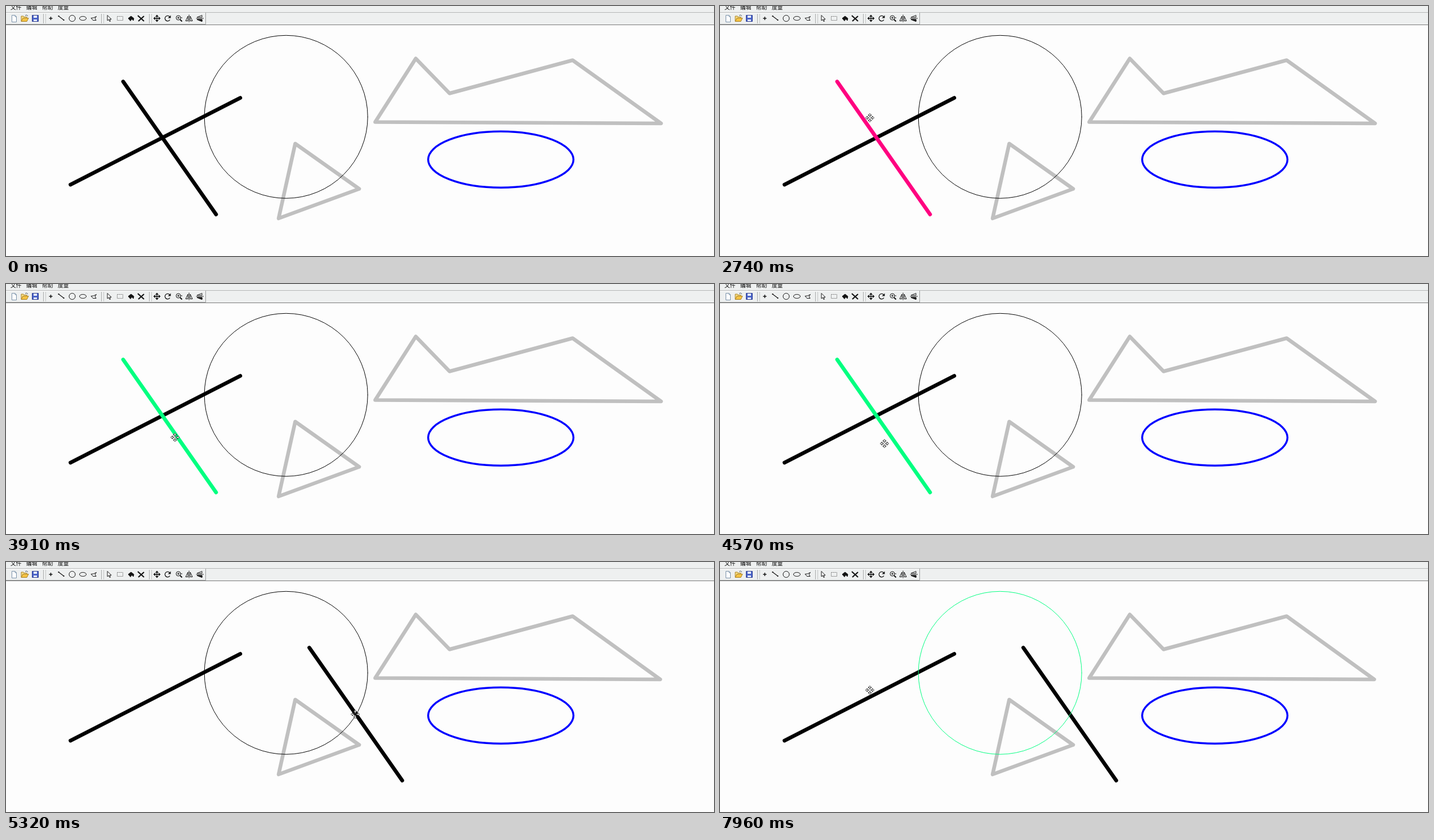
An HTML page with a canvas that plays this animation: 1257 by 445 pixels, repeating every 7.99 s.

```html
<!DOCTYPE html>
<html lang="zh">
<head>
<meta charset="utf-8">
<title>Drawing tool</title>
<style>
  html, body { margin: 0; width: 100%; height: 100%; overflow: hidden; background: #fdfdfd; }
  svg, canvas { position: absolute; left: 0; top: 0; display: block; }
  .menu { font: 9.7px "Noto Sans CJK SC", "Noto Sans CJK", sans-serif; fill: #000; }
</style>
</head>
<body>
<svg width="1257" height="34" viewBox="0 0 1257 34" fill="none" stroke="#111">
  <path d="M0 0H1257V33H0z" fill="#eef0f0" stroke="none"/>
  <g class="menu" stroke="none">
    <text x="8" y="6">文件</text><text x="36" y="6">编辑</text>
    <text x="64" y="6">帮助</text><text x="92" y="6">度量</text>
  </g>
  <path d="M0 11.5H1257" stroke="#b4b6b6"/>
  <path d="M0 12.5H354" stroke="#fff"/>
  <path d="M0 32.5H354.5V12" stroke="#9a9c9c"/>
  <path d="M0 33.5H1257" stroke="#777"/>
  <path d="M66.5 14V31M169.5 14V31M254.5 14V31" stroke="#a8aaaa"/>
  <path d="M70.5 14V31M173.5 14V31M258.5 14V31" stroke="#c4c6c6"/>

  <path d="M10.500 16.500H16L18.500 19V28.500H10.500z" fill="#fff" stroke="#7890a8"/>
  <path d="M16 16.500V19H18.500" stroke="#7890a8"/>
  <path d="M27 27V18H31L32 19.500H37V21" fill="#f6dc83" stroke="#a88024"/>
  <path d="M27 27.500L30 21.500H40L37 27.500z" fill="#f5c344" stroke="#a88024"/>
  <path d="M34 17Q37 14.500 39 18" stroke="#456"/>
  <path d="M46.500 16.500H57.500V27.500H46.500z" fill="#4a63c8" stroke="#2c3c90"/>
  <path d="M49 17H55V21H49zM49 24H55V27H49z" fill="#e6ecfa" stroke="none"/>

  <path d="M79.500 19V25M76.500 22H82.500" stroke-width="1.400"/>
  <path d="M94 18.500L102 24.500" stroke-width="1.200"/>
  <path d="M92.500 17h2v2h-2zM101.500 24h2v2h-2z" fill="#111" stroke="none"/>
  <circle cx="117.500" cy="22" r="5.500"/>
  <ellipse cx="136.500" cy="22" rx="6" ry="3.500"/>
  <path d="M151 21.500L155.500 21L160.500 18.500L158 22L160 25.500L154.500 25.500z"/>

  <path d="M180 16.500V26L182.300 24L184 27.500L185.500 27L184 23.500H187z" fill="#fff"/>
  <path d="M197.500 18.500H207.500V25.500H197.500z" stroke-dasharray="2 1" stroke="#777"/>
  <path d="M217 22L222 18L227 22L226 26L223.500 23L221 26.500z" fill="#111"/>
  <path d="M234 17L245 27M245 18L235 27" stroke-width="2.200"/>

  <path d="M268 17V27M263 22H273" stroke-width="1.300"/>
  <path d="M268 15.500L271 19H265zM268 28.500L271 25H265zM261.500 22L265 19V25zM274.500 22L271 19V25z" fill="#111" stroke="none"/>
  <path d="M290.500 19A4.700 4.700 0 1 0 291 24.500" stroke-width="1.300"/>
  <path d="M292.500 16.500V21.500H287.500z" fill="#111" stroke="none"/>
  <circle cx="306" cy="21" r="4"/>
  <path d="M309 24L312.500 27.500" stroke-width="2"/>
  <path d="M304 21H308M306 19V23M310 21H313"/>
  <path d="M325 15.500V28.500M323 18V26.500H319zM327 18V26.500H331z"/>
  <path d="M337.500 22H351M348 20V16.500L339 20zM348 24V27.500L339 24z" stroke="#222"/>
  <path d="M348 24V27.500L339 24z" fill="#222"/>
</svg>
<canvas id="stage" width="1257" height="445"></canvas>

<script>
const ctx = document.getElementById('stage').getContext('2d');
const LOOP = 7990, STEP = 30, START = 100;
const PINK = '#ff0080', GREEN = '#00ff80', GRAY = '#c0c0c0';

// pointer path: time, x, y
const path = [
  [100, 1214, 36], [220, 1069, 55], [340, 910, 69], [460, 711, 71], [610, 449, 37],
  [760, 190, 13], [800, 147, 11], [880, 181, 25], [1300, 181, 25],
  [1390, 191, 56], [1480, 211, 97], [1660, 242, 176], [1930, 242, 176],
  [2050, 258, 125], [2150, 262, 70], [2320, 269, 24], [2590, 269, 24],
  [2740, 266, 199], [2920, 289, 253], [3010, 289, 253], [3220, 259, 211],
  [3400, 301, 204], [3490, 321, 204], [3640, 343, 242], [3910, 300, 273],
  [4180, 174, 280], [4390, 219, 288], [4570, 292, 284], [4870, 412, 281],
  [5020, 544, 269], [5110, 608, 269], [5200, 620, 271], [5350, 620, 271],
  [5680, 195, 41], [5740, 181, 25], [5980, 181, 25], [6310, 384, 105],
  [6550, 384, 105], [6760, 280, 54], [6940, 270, 24], [7270, 270, 24],
  [7510, 456, 148], [7600, 456, 148], [7720, 388, 150], [7840, 278, 162],
  [7930, 280, 224], [7960, 266, 228], [7990, 266, 228]
];
const selectTool = { x: 173, clicks: [1120, 5830] };
const moveTool = { x: 258, clicks: [2470, 7150] };
// moments at which the inverted drag preview is on screen
const previews = [3220, 3400, 3430, 3490, 3640, 4180, 4240, 4330, 4390, 4720, 4870, 5020, 5110, 7720, 7840];

const within = (t, a, b) => t >= a && t < b;

function slope(i, k) {
  const a = path[i - 1], b = path[i], c = path[i + 1];
  if (!a || !c) return 0;
  const before = b[k] - a[k], after = c[k] - b[k];
  return before * after <= 0 ? 0 : (before + after) / (c[0] - a[0]);
}

function pointer(t) {
  let i = 0;
  while (i < path.length - 2 && path[i + 1][0] <= t) i++;
  const a = path[i], b = path[i + 1], d = b[0] - a[0], u = (t - a[0]) / d;
  const s = u * u * (3 - 2 * u);
  return [1, 2].map(k => a[k] + (b[k] - a[k]) * s
    + d * u * (1 - u) * ((1 - u) * slope(i, k) - u * slope(i + 1, k)));
}

function poly(points, color, width, closed) {
  ctx.beginPath();
  for (let i = 0; i < points.length; i += 2) ctx.lineTo(points[i], points[i + 1]);
  if (closed) ctx.closePath();
  ctx.strokeStyle = color;
  ctx.lineWidth = width;
  ctx.stroke();
}

function oval(x, y, rx, ry, color, width) {
  ctx.beginPath();
  ctx.ellipse(x, y, rx, ry, 0, 0, 7);
  ctx.strokeStyle = color;
  ctx.lineWidth = width;
  ctx.stroke();
}

const bar = (dx, dy, color) => poly([208 + dx, 134.5 + dy, 373 + dx, 371 + dy], color, 6.6);
const ring = (dx, dy, color) => oval(497.2 + dx, 197.3 + dy, 145, 145, color, 1);

function button(tool, t, x, y) {
  if (!within(x, tool.x, tool.x + 20) || !within(y, 13, 32)) return;
  const down = tool.clicks.some(c => within(t, c, c + STEP));
  const l = tool.x + .5, r = l + 19, top = 13.5, bottom = 30.5;
  poly([l, bottom, l, top, r, top], down ? '#888' : '#fff', 1);
  poly([l, bottom, r, bottom, r, top], down ? '#fff' : '#888', 1);
}

const arrow = new Path2D('M.5 .5V12L3.200 9.500L5 14L6.800 13.200L5 9H8.300z');
const moveArm = new Path2D('M0-7.500L3-4.500H1V-2.500L0-1.500L-1-2.500V-4.500H-3z');

function cursor(x, y, moving) {
  ctx.save();
  ctx.translate(Math.round(x), Math.round(y));
  ctx.fillStyle = '#fff';
  ctx.strokeStyle = '#222';
  ctx.lineWidth = 1;
  for (let i = 0; i < (moving ? 4 : 1); i++) {
    const shape = moving ? moveArm : arrow;
    ctx.fill(shape);
    ctx.stroke(shape);
    ctx.rotate(Math.PI / 2);
  }
  ctx.restore();
}

function draw(time) {
  const t = time < START ? 0 : START + Math.floor((time - START) / STEP) * STEP;
  const [x, y] = pointer(t);
  const placed = t >= 5260;

  ctx.clearRect(0, 0, 1257, 445);
  ctx.fillStyle = '#fdfdfd';
  ctx.fillRect(0, 34, 1257, 411);
  ctx.lineCap = ctx.lineJoin = 'round';

  poly([727.5, 93.5, 787.5, 155.5, 1006, 96.5, placed ? 1161.5 : 1163, 209, 655.5, 206.5], GRAY, 6.6, true);
  poly([513.5, 245, 627, 325.5, 484, 378], GRAY, 6.6, true);
  oval(878.5, 273.3, 129, 50, '#00f', 3.5);
  poly([114.5, 318, 416, 163.5], '#000', 6.6);
  if (placed) bar(330.5, 18, '#000');
  else bar(0, 0, t >= 2980 ? GREEN : t >= 1690 ? PINK : '#000');
  ring(0, 0, t >= 7570 ? GREEN : t >= 6370 ? PINK : '#000');

  if (previews.includes(t)) {
    ctx.globalCompositeOperation = 'difference';
    if (placed) ring(x - 456, y - 148, '#fff');
    else bar(x - 289, y - 253, '#fff');
    ctx.globalCompositeOperation = 'source-over';
  }

  if (t < START) return;
  ctx.lineCap = 'butt';
  ctx.lineJoin = 'miter';
  button(selectTool, t, x, y);
  button(moveTool, t, x, y);
  const moving = y > 34 && (within(t, 2470, 5830) || t >= 7150);
  cursor(x, y, moving);
}

const begin = performance.now();
function frame() {
  draw((performance.now() - begin) % LOOP);
  requestAnimationFrame(frame);
}
frame();
</script>
</body>
</html>
```
